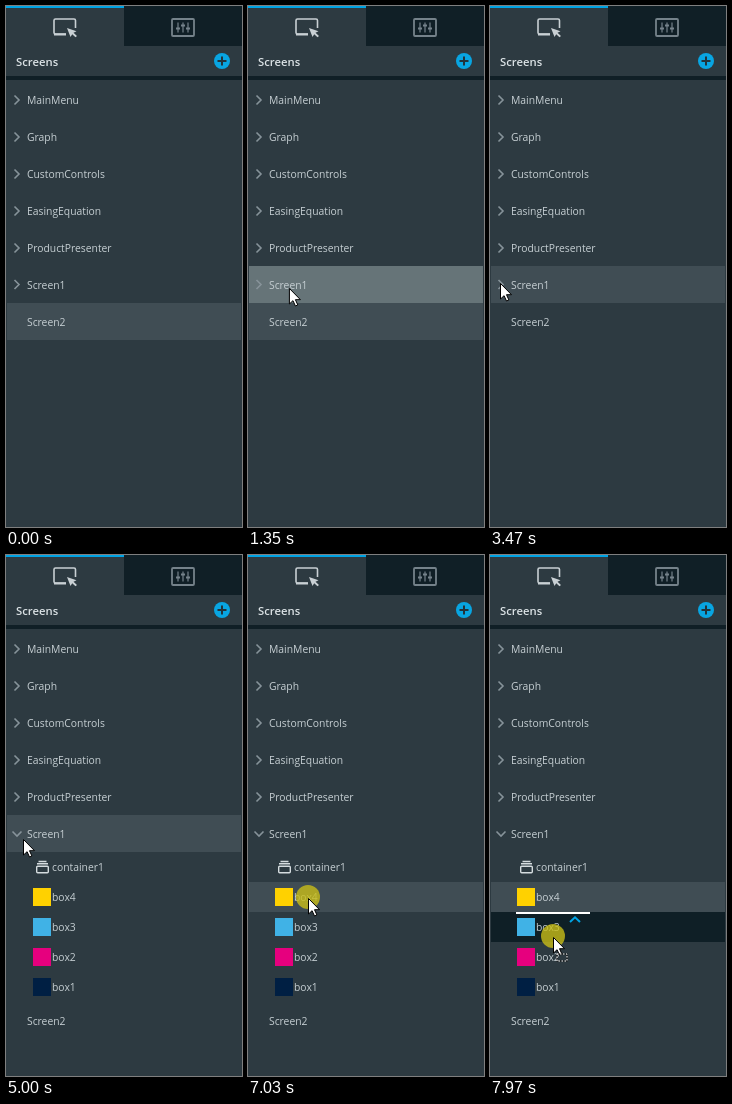
Animation of 236x521 px, one loop 8000 ms. Source, as an HTML page:

```html
<!DOCTYPE html>
<html lang="en">
<head>
<meta charset="utf-8">
<title>Screens panel</title>
<style>
html, body { margin: 0; width: 100%; height: 100%; overflow: hidden; background: #2d3a41; }
svg { display: block; }
text { font: 10.35px "Open Sans", "Noto Sans", sans-serif; fill: #c6cfd3; }
.title { font-size: 11.3px; font-weight: 600; fill: #dce3e6; }
.line { fill: none; stroke: #87939a; stroke-width: 1.6; }
</style>
</head>
<body>
<svg id="stage" width="236" height="521" viewBox="0 0 236 521">
  <rect width="236" height="521" fill="#2d3a41"/>
  <rect x="118" width="118" height="40" fill="#101f26"/>
  <rect width="118" height="2" fill="#00a3e4"/>
  <rect y="70" width="236" height="4" fill="#101f26"/>

  <g stroke="#c9d0d4" stroke-width="1.6" fill="none">
    <path d="M60 28H49.500Q48 28 48 26.500V14.500Q48 13 49.500 13H68Q69.500 13 69.500 14.500V22"/>
    <path d="M48 28.500H60" stroke-width="2"/>
    <path d="M61 22L70.500 25.300 67.500 26.800 71 30 69.500 31.300 66.200 28.200 64.500 31Z" fill="#c9d0d4" stroke="none"/>
  </g>
  <g stroke="#75828a" fill="none">
    <rect x="166" y="13" width="22" height="17" rx="1" stroke-width="1.8"/>
    <path d="M172 16.500V26.500M177 16.500V26.500M182 16.500V26.500" stroke-width="1.2"/>
    <path d="M170 22.500H174M175 19.500H179M180 22.500H184" stroke-width="2"/>
  </g>

  <text class="title" x="10" y="60">Screens</text>
  <circle cx="216" cy="55" r="8" fill="#08a5e2"/>
  <path d="M211.500 55H220.500M216 50.500V59.500" stroke="#22333b" stroke-width="2"/>

  <g id="rows"></g>
  <g id="drop" fill="none" stroke-width="2">
    <path d="M26 358H100" stroke="#fff"/>
    <path d="M80 367L85 362.300 90 367" stroke="#00a3e4"/>
  </g>
  <circle id="press" r="12" fill="#c8bd18" fill-opacity=".8"/>
  <g id="cursor">
    <path d="M0 0V15.500L3.600 12.200 6 17.500 8.400 16.500 6 11.200H11Z" fill="#fff" stroke="#000" stroke-linejoin="round"/>
    <g id="ghost" fill="none">
      <rect x="3.500" y="16.500" width="10" height="7" stroke="#111"/>
      <rect x="3.500" y="16.500" width="10" height="7" stroke="#fff" stroke-dasharray="1.500 1.500"/>
    </g>
  </g>
</svg>
<script>
const LOOP = 8000;
const SELECTED = '#404d54', HOVER = '#667478', TARGET = '#0f1f26';
const $ = id => document.getElementById(id);

const screens = ['MainMenu', 'Graph', 'CustomControls', 'EasingEquation', 'ProductPresenter', 'Screen1', 'Screen2'];
const children = [['container1'], ['box4', '#ffd100'], ['box3', '#40b2e6'], ['box2', '#e6007e'], ['box1', '#001f43']];
const containerIcon = `<g fill="none" stroke="#d5dcdf" stroke-width="1.4">
  <path d="M32.500 -5.500H40.500M31 -3.200H42"/><rect x="30.700" y="-.8" width="11.600" height="6.600" rx="1"/></g>`;

const rows = {};
function addRow(name, y, height, labelX, extra = '') {
  const g = document.createElementNS('http://www.w3.org/2000/svg', 'g');
  g.innerHTML = `<rect x="1" y="${-height / 2}" width="234" height="${height}" fill="none"/>
    ${extra}<text x="${labelX}" y="4">${name}</text>`;
  $('rows').append(g);
  rows[name] = { g, y, height, back: g.firstElementChild };
}
screens.forEach((name, i) => addRow(name, 94 + 37 * i - (i > 4 ? .5 : 0), 37, 21,
  name === 'Screen2' ? '' : '<path class="line" d="M8.500 -4.500L13 0 8.500 4.500"/>'));
children.forEach(([name, color], i) => addRow(name, 312 + 30 * i, 30, 46,
  color ? `<rect x="27" y="-9" width="18" height="18" fill="${color}"/>` : containerIcon));
const arrow = rows.Screen1.g.querySelector('path');

// Pointer positions: time, x, y
const path = [
  [0, 36, 540], [49, 36, 540], [50, 36, 516], [520, 32, 279], [840, 37, 318], [890, 37, 318],
  [1400, 41, 281], [2730, 41, 281], [2845, 24, 283], [2960, 6, 278], [3290, 6, 278], [3470, 10, 277],
  [4999, 10, 277], [5000, 17, 284], [5510, 60, 343], [7260, 60, 343], [7970, 63, 382], [LOOP, 63, 382]
];
function pointerAt(t) {
  const i = path.findIndex(p => p[0] > t);
  const [t0, x0, y0] = path[i - 1], [t1, x1, y1] = path[i];
  const u = (t - t0) / (t1 - t0), k = u * u * (3 - 2 * u);
  return [x0 + (x1 - x0) * k, y0 + (y1 - y0) * k];
}

const between = (t, a, b) => t >= a && t < b;
const show = (el, on) => el.setAttribute('visibility', on ? 'visible' : 'hidden');
const move = (el, x, y) => el.setAttribute('transform', `translate(${x} ${y})`);

function draw(t) {
  const [x, y] = pointerAt(t);
  const open = t >= 3880;
  const dragging = t >= 7260 && y > 346;
  const dropping = dragging && y > 357;
  const selected = t < 1825 ? 'Screen2' : t < 5830 ? 'Screen1' : 'box4';

  rows.Screen2.y = open ? 465.5 : 315.5;
  for (const [name, row] of Object.entries(rows)) {
    const visible = open || screens.includes(name);
    const over = visible && t >= 890 && Math.abs(y - row.y) < row.height / 2;
    show(row.g, visible);
    move(row.g, 0, row.y);
    row.back.setAttribute('fill', name === selected ? SELECTED : over ? (dragging ? TARGET : HOVER) : 'none');
  }
  arrow.setAttribute('d', open ? 'M6.500 -2L11 2.500 15.500 -2' : 'M8.500 -4.500L13 0 8.500 4.500');

  const pressed = between(t, 1760, 1890) || between(t, 3750, 3880) || between(t, 5740, 5920) || t >= 7030;
  show($('press'), pressed);
  show($('drop'), dropping);
  show($('ghost'), dragging);
  move($('press'), x, y - 1);
  move($('cursor'), x + .5, y + .5);
}

const start = performance.now();
(function frame() {
  draw((performance.now() - start) % LOOP);
  requestAnimationFrame(frame);
})();
</script>
</body>
</html>
```
